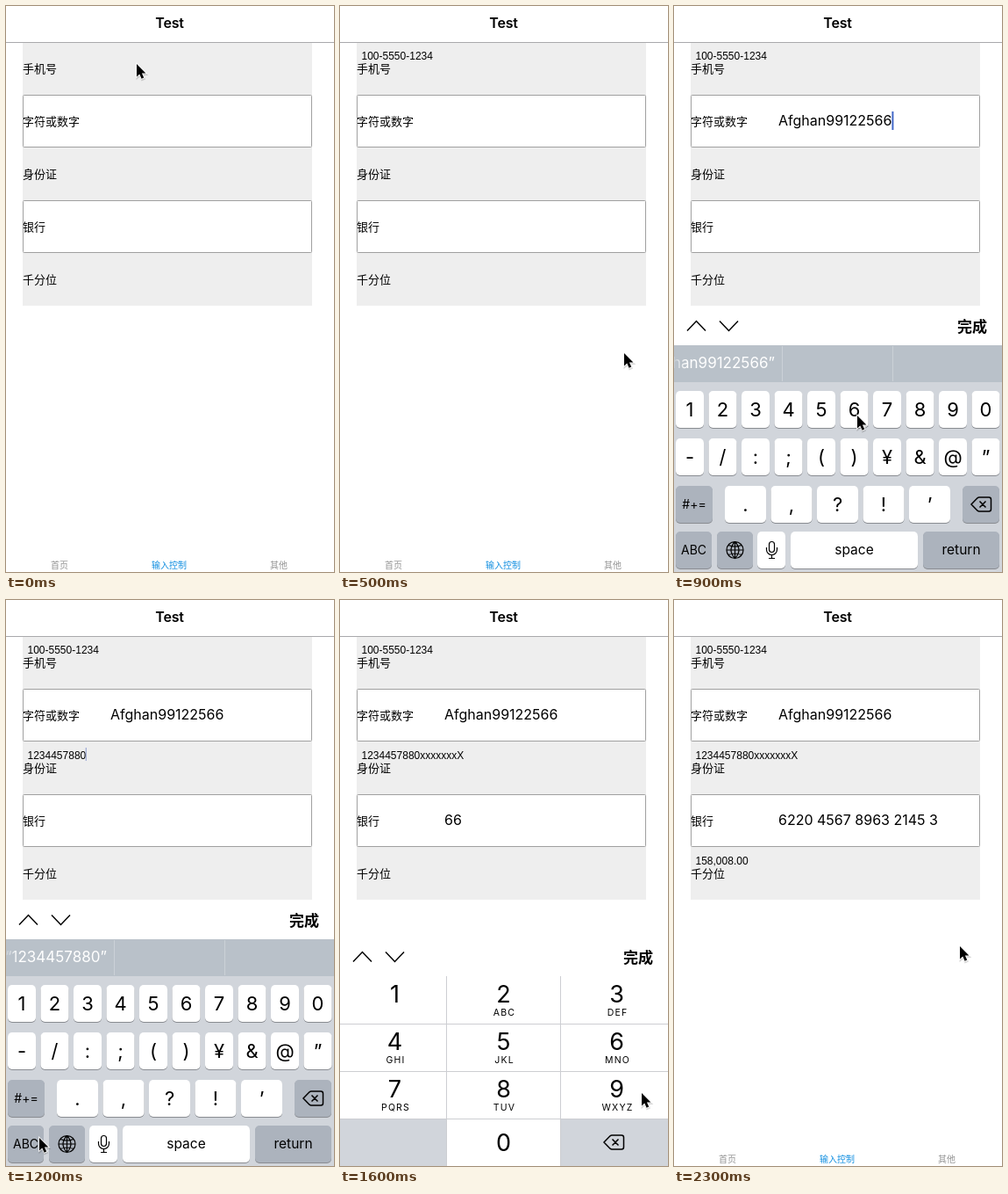
An HTML page that plays this animation: 374x644 px, repeating every 2400 ms.

```html
<!DOCTYPE html>
<html lang="zh-CN">
<head>
<meta charset="utf-8">
<title>Test</title>
<style>
  html, body { margin: 0; width: 100%; height: 100%; overflow: hidden; background: #fff; }
  svg { display: block; font-family: Inter, "Noto Sans CJK SC", sans-serif; }
  .small { font-family: "Liberation Sans", Arial, sans-serif; font-size: 12px; }
  .large { font-size: 16px; }
  .label { font-family: "Noto Sans CJK SC", sans-serif; font-size: 13px; }
  .tab { font-family: "Noto Sans CJK SC", sans-serif; font-size: 10px; }
  .done { font-family: "Noto Sans CJK SC", sans-serif; font-size: 17px; font-weight: 700; }
  .title { font-size: 16px; font-weight: 600; letter-spacing: -.2px; }
  .digit { font-size: 27px; }
  .sub { font-size: 10.5px; letter-spacing: 1.2px; }
  .char { font-size: 22px; }
  .word { font-size: 15.5px; }
  .tiny { font-size: 14px; }
  .hint { font-size: 17px; }
  .line { fill: none; stroke: #000; stroke-width: 1.5; }
</style>
</head>
<body>
<svg id="stage" width="374" height="644" viewBox="0 0 374 644"></svg>
<script>
const stage = document.getElementById("stage");
const LABELS = ["手机号", "字符或数字", "身份证", "银行", "千分位"];
const ID = "1234457880";
const FRAME = 100;

// pointer x, pointer y, keyboard, edited field, its value
const STEPS = [
  [149, 66, "", 0, ""],
  [149, 66, "phone", 0, ""],
  [186, 505, "phone", 0, "1005"],
  [186, 617, "phone", 0, "10055501"],
  [324, 395, "phone", 0, "10055501234"],
  [324, 395, "", 0, "100-5550-1234"],
  [228, 568, "abc", 1, "Afghan"],
  [324, 469, "123", 1, "Afghan9"],
  [58, 466, "123", 1, "Afghan9912"],
  [209, 466, "123", 1, "Afghan99122566"],
  [100, 190, "123", 2, ""],
  [133, 466, "123", 2, "12344"],
  [38, 612, "123", 2, ID],
  [38, 612, "abc", 2, ID],
  [118, 570, "abc", 2, ID + "xxxx"],
  [118, 570, "abc", 2, ID + "xxxxxxxX"],
  [344, 561, "bank", 3, "66"],
  [186, 505, "bank", 3, "6220 45"],
  [316, 561, "bank", 3, "6220 4567 8963"],
  [316, 451, "bank", 3, "6220 4567 8963 2145 3"],
  [152, 402, "money", 4, ""],
  [186, 560, "money", 4, "158"],
  [186, 617, "money", 4, "158008.00"],
  [326, 394, "", 4, "158,008.00"]
];

const text = (s, x, y, cls, anchor = "middle", fill = "#000") =>
  `<text x="${x}" y="${y}" class="${cls}" text-anchor="${anchor}" fill="${fill}">${s.replace(/&/g, "&amp;")}</text>`;
const rect = (x, y, w, h, fill, more = "") =>
  `<rect x="${x}" y="${y}" width="${w}" height="${h}" fill="${fill}" ${more}/>`;
const path = (d, more = "") => `<path class="line" d="${d}" ${more}/>`;
const erase = (x, y) =>
  path(`M${x - 11} ${y}l7-7.2q1-.8 2-.8h11q2.5 0 2.5 2.5v11q0 2.5-2.5 2.5h-11q-1 0-2-.8zM${x - 1.5} ${y - 3.5}l7 7m0-7l-7 7`);

function page(values) {
  let out = rect(0, 0, 374, 644, "#fff") + text("Test", 186.5, 25, "title") +
    rect(0, 41, 374, 1, "#a9a9ac") + rect(19, 42, 330, 299, "#eee");
  LABELS.forEach((label, i) => {
    const y = 71 + 60 * i, big = i % 2;
    if (big) out += rect(19.5, y - 29.5, 329, 59, "#fff", 'rx="1" stroke="#a0a0a0"');
    out += text(label, 19, y + 5, "label", "start");
    if (values[i]) out += big
      ? text(values[i], 119, y + 5, "large", "start")
      : text(values[i], 24.5, y - 10.5, "small", "start");
  });
  return out;
}

function tabs() {
  return text("首页", 61, 640, "tab", "middle", "#929292") +
    text("输入控制", 186, 640, "tab", "middle", "#108ee0") +
    text("其他", 311, 640, "tab", "middle", "#929292");
}

function toolbar(y, field) {
  const dim = 'style="stroke:#aaa"';
  return rect(0, y - 20, 374, 42, "#fff") +
    path(`M15 ${y + 5.5}l10.5-11 10.5 11`, field == 0 ? dim : "") +
    path(`M52 ${y - 5.5}l10.5 11 10.5-11`, field == 4 ? dim : "") +
    text("完成", 340, y + 6.5, "done");
}

function keypad(kind, field) {
  const cols = [62.5, 186.5, 315.5], grey = "#d1d5db";
  const subs = ["", "ABC", "DEF", "GHI", "JKL", "MNO", "PQRS", "TUV", "WXYZ"];
  let out = toolbar(406, field) + rect(0, 428, 374, 216, "#fff") +
    rect(0, 590, 122, 54, grey) + rect(252, 590, 122, 54, grey);
  for (const x of [121, 251]) out += rect(x, 428, 1, 216, "#cdced2");
  for (const y of [482, 536, 590]) out += rect(0, y, 374, 1, "#cdced2");
  subs.forEach((sub, i) => {
    const x = cols[i % 3], y = 458 + 54 * Math.floor(i / 3);
    out += text(String(i + 1), x, y, "digit") + text(sub, x + 1, y + 15, "sub");
  });
  out += text("0", 186.5, 627, "digit") + erase(312, 617);
  if (kind == "phone")
    out += path("M31 615h14m-7-7v14M51 615h14m-11-6l8 12m0-12l-8 12M71 612h14m-14 6h14M76 608l-1 14m7-14l-1 14");
  if (kind == "money") out += text(".", 60, 625, "digit");
  return out;
}

function key(x, y, w, label = "", cls = "char", fill = "#fff") {
  const drop = { char: 8, word: 5, tiny: 5 }[cls];
  return rect(x, y + 1, w, 42, "#898c91", 'rx="5"') + rect(x, y, w, 42, fill, 'rx="5"') +
    text(label, x + w / 2, y + 21 + drop, cls);
}

const row = (chars, x, y, pitch, w) =>
  [...chars].map((c, i) => key(x + i * pitch, y, w, c)).join("");

function suggestion(value) {
  if (!value) return "";
  const s = `“${value}”`;
  return value.length > 8
    ? text(s, 115, 411.5, "hint", "end", "url(#fade)")
    : text(s, 61, 411.5, "hint", "middle", "#fff");
}

function keyboard(kind, field, value) {
  const grey = "#acb3bd", abc = kind == "abc";
  let out = toolbar(364, field) + rect(0, 386, 374, 42, "#b9c1c9") + rect(0, 428, 374, 216, "#d1d5db") +
    rect(123, 387, 1, 40, "#cbd1d7") + rect(249, 387, 1, 40, "#cbd1d7") +
    `<linearGradient id="fade" gradientUnits="userSpaceOnUse" x1="0" y1="0" x2="14" y2="0">
      <stop stop-color="#fff" stop-opacity=".2"/><stop offset="1" stop-color="#fff"/></linearGradient>` +
    suggestion(value);
  out += abc
    ? row("qwertyuiop", 2, 438, 37.5, 32) + row("asdfghjkl", 20.75, 492, 37.5, 32) +
      row("zxcvbnm", 58.25, 546, 37.5, 32) + key(2, 546, 42, "", "tiny", grey) +
      path("M23 558l-9 9h5v8h8v-8h5z")
    : row("1234567890", 2, 438, 37.5, 32) + row("-/:;()¥&@”", 2, 492, 37.5, 32) +
      row(".,?!’", 58, 546, 52.5, 47) + key(2, 546, 42, "#+=", "tiny", grey);
  out += key(329, 546, 42, "", "char", grey) + erase(350, 567) +
    key(2, 598, 41, abc ? "123" : "ABC", "tiny", grey) + key(49, 598, 41, "", "char", grey) +
    key(95, 598, 32) + key(133, 598, 145, "space", "word") + key(284, 598, 87, "return", "word", grey);
  // globe and microphone
  return out +
    path("M60 619a9.5 9.5 0 1 0 19 0a9.5 9.5 0 1 0-19 0h19M69.5 609.5v19M69.5 609.5q-9 9.5 0 19q9-9.5 0-19M62 613.5q7.5 3 15 0M62 624.5q7.5-3 15 0", 'style="stroke-width:1.2"') +
    path("M108.5 612.5a3 3 0 0 1 6 0v6a3 3 0 0 1-6 0zM105.5 616v2.5a6 6 0 0 0 12 0v-2.5M111.5 624.5v4M108 628.5h7", 'style="stroke-width:1.2"');
}

function pointer(x, y) {
  const d = "M0 0V14.5L3.3 11.4L5.6 16.7L8.2 15.6L5.9 10.4H10.4Z";
  return `<g transform="translate(${x} ${y})"><path d="${d}" transform="translate(.5 1.5)" fill="#000" stroke="#000" stroke-width="2" opacity=".15"/>` +
    `<path d="${d}" stroke="#fff" stroke-width="1.6" paint-order="stroke"/></g>`;
}

function caret(field, value) {
  const big = field % 2, y = 71 + 60 * field;
  const label = [...stage.querySelectorAll(big ? ".large" : ".small")]
    .find(t => t.textContent == value);
  const x = (big ? 119 : 23) + (value && label ? label.getComputedTextLength() + (big ? 0 : 1) : 0);
  return big ? rect(x, y - 11, 2, 21, "#4268c8") : rect(x, y - 23, value ? 1 : 2, 15, value ? "#8d9cd0" : "#4a72c4");
}

function draw(n) {
  const [x, y, kind, field, value] = STEPS[n];
  const values = [];
  for (const s of STEPS.slice(0, n + 1)) values[s[3]] = s[4];
  const board = !kind ? tabs()
    : /abc|123/.test(kind) ? keyboard(kind, field, value)
    : keypad(kind, field);
  stage.innerHTML = page(values) + board;
  const blinkOn = kind && n % 12 != 4;
  stage.insertAdjacentHTML("beforeend", (blinkOn ? caret(field, value) : "") + pointer(x, y));
}

let shown = -1;
function tick() {
  const n = Math.floor(performance.now() / FRAME) % STEPS.length;
  if (n != shown) draw(shown = n);
  requestAnimationFrame(tick);
}
tick();
</script>
</body>
</html>
```
